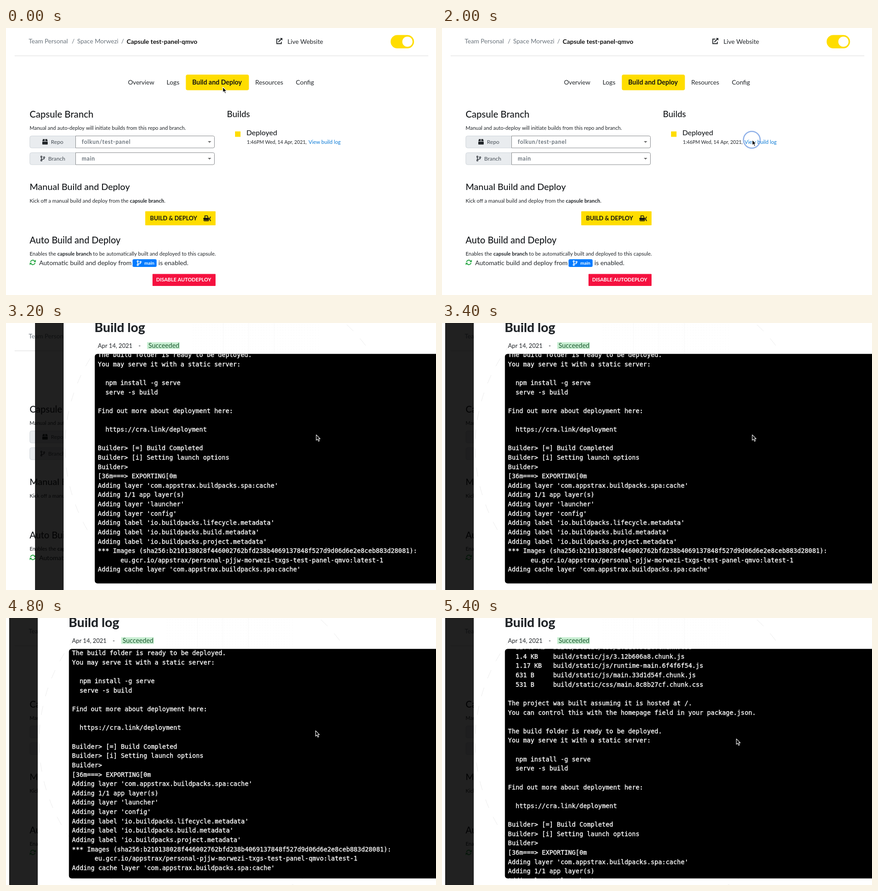
Recreate the animation shown at these times as an HTML page with a canvas. Size 948 by 590 pixels, loop 5600 ms.

```html
<!DOCTYPE html>
<html lang="en">
<head>
<meta charset="utf-8">
<title>Build and Deploy</title>
<style>
  html, body { margin: 0; width: 100%; height: 100%; overflow: hidden; background: #fff; }
  canvas { display: block; width: 948px; height: 590px; }
</style>
</head>
<body>
<canvas id="stage"></canvas>
<script>
const W = 948, H = 590, LOOP = 5600, STEP = 200;
const SANS = 'Lato, "Open Sans", sans-serif';
const MONO = '"DejaVu Sans Mono", "Liberation Mono", monospace';
const YELLOW = '#ffdd00', INK = '#212529', GREY = '#6c757d';

const canvas = document.getElementById('stage');
const ctx = canvas.getContext('2d');
const dpr = window.devicePixelRatio || 1;
canvas.width = W * dpr;
canvas.height = H * dpr;

const clamp = v => Math.min(1, Math.max(0, v));
const span = (t, a, b) => clamp((t - a) / (b - a));
const ease = p => p * p * (3 - 2 * p);

// y is the middle of the capitals; returns the x where the text ends
function text(str, x, y, size, color = INK, weight = 400, gap = 0) {
  ctx.font = `${weight} ${size}px ${SANS}`;
  ctx.letterSpacing = gap + 'px';
  ctx.fillStyle = color;
  ctx.fillText(str, x, y + size * 0.36);
  const end = x + ctx.measureText(str).width;
  ctx.letterSpacing = '0px';
  return end;
}

const heading = (str, x, y, size) => text(str, x, y, size, '#16191c', 500);

function box(x, y, w, h, r, fill, stroke) {
  ctx.beginPath();
  ctx.roundRect(x, y, w, h, r);
  if (fill) { ctx.fillStyle = fill; ctx.fill(); }
  if (stroke) { ctx.strokeStyle = stroke; ctx.lineWidth = 1; ctx.stroke(); }
}

function circle(x, y, r, fill) {
  ctx.beginPath();
  ctx.arc(x, y, r, 0, Math.PI * 2);
  ctx.fillStyle = fill;
  ctx.fill();
}

function line(color, width, ...pts) {
  ctx.beginPath();
  for (let i = 0; i < pts.length; i += 2) ctx.lineTo(pts[i], pts[i + 1]);
  ctx.strokeStyle = color;
  ctx.lineWidth = width;
  ctx.stroke();
}

function shape(fill, ...pts) {
  ctx.beginPath();
  for (let i = 0; i < pts.length; i += 2) ctx.lineTo(pts[i], pts[i + 1]);
  ctx.closePath();
  ctx.fillStyle = fill;
  ctx.fill();
}

function at(x, y, draw) {
  ctx.save();
  ctx.translate(x, y);
  draw();
  ctx.restore();
}

function linkIcon() {
  line(INK, 1.8, 0, -4.5, -5.5, -4.5, -5.5, 5.5, 4.5, 5.5, 4.5, 1.5);
  line(INK, 2, -2, 2, 4.5, -4.5);
  shape(INK, 1.3, -6.8, 6.8, -6.8, 6.8, -1.3);
}

function packageIcon() {
  shape(INK, -4.5, -6, -0.6, -6, -0.6, -1.5, -6, -1.5);
  shape(INK, 0.6, -6, 4.5, -6, 6, -1.5, 0.6, -1.5);
  box(-6, -0.5, 12, 6.5, 1, INK);
}

function branchIcon(color) {
  const ring = (x, y) => {
    ctx.beginPath();
    ctx.arc(x, y, 1.5, 0, Math.PI * 2);
    ctx.lineWidth = 1.4;
    ctx.stroke();
  };
  line(color, 1.5, -3, -2.5, -3, 2.5);
  line(color, 1.5, 3, -1, 3, 0.3, 2, 1.2, -3, 1.7);
  ring(-3, -4);
  ring(-3, 4);
  ring(3, -2.6);
}

function refreshIcon() {
  const color = '#28a745';
  ctx.strokeStyle = color;
  ctx.lineWidth = 2;
  for (let i = 0; i < 2; i++) {
    ctx.beginPath();
    ctx.arc(0, 0, 5, Math.PI * 1.05, Math.PI * 1.8);
    ctx.stroke();
    shape(color, 6.8, -6, 6.8, -0.8, 1.6, -0.8);
    ctx.rotate(Math.PI);
  }
}

function dozerIcon() {
  const c = '#111';
  line(c, 1.6, -4.5, 0, -4.5, -5.5, 1, -5.5, 3, 0);
  box(-8, -1, 12.5, 3.5, 1, c);
  box(-7.5, 2.2, 12, 4.3, 2.1, c);
  for (const x of [-4.7, -1.5, 1.7]) circle(x, 4.4, 0.9, YELLOW);
  line(c, 1.6, 8.2, -3.5, 6.4, -1, 6.4, 3, 8.4, 6);
  line(c, 1.3, 4, 1.5, 6.4, 1.5);
}

function field(y, label, labelX, value) {
  box(52.5, y, 101, 26.5, [4, 0, 0, 4], '#e9ecef', '#ced4da');
  box(153.5, y, 306, 26.5, [0, 3, 3, 0], '#fff', '#85888b');
  text(label, labelX, y + 13, 12.2, '#495057');
  text(value, 167, y + 13.2, 12.3, GREY, 700, 0.7);
  shape('#6a6a6a', 445, y + 11.5, 452.5, y + 11.5, 448.7, y + 15.3);
}

function page() {
  text('Team Personal', 50, 29.5, 13.7, GREY);
  text('/', 145, 29.5, 13.7, GREY);
  text('Space Morwezi', 157, 29.5, 13.6, GREY);
  text('/', 254, 29.5, 13.7, GREY);
  text('Capsule test-panel-qmvo', 266, 29.5, 14, '#111', 700);
  at(602.5, 29, linkIcon);
  text('Live Website', 620.5, 29.5, 13.9);
  box(848, 15.5, 51.5, 29.5, 14.75, YELLOW);
  circle(885, 30.2, 11.3, '#fff');
  line('#dcdcdc', 1, 19, 61.5, 931, 61.5);

  box(396.5, 103, 139, 34.5, 4, YELLOW);
  text('Overview', 269, 120, 13.6);
  text('Logs', 354, 120, 14.2);
  text('Build and Deploy', 410.5, 120, 14.4, '#111', 700);
  text('Resources', 549.5, 120, 13.8);
  text('Config', 639, 120, 14);

  heading('Capsule Branch', 52, 190.5, 20.6);
  text('Manual and auto-deploy will initiate builds from this repo and branch.', 52, 221, 11.35);
  field(238.5, 'Repo', 99, 'folkun/test-panel');
  at(86, 251.5, packageIcon);
  field(275.5, 'Branch', 93, 'main');
  at(81, 288.5, () => branchIcon('#343a40'));

  heading('Manual Build and Deploy', 52, 351, 20);
  let x = text('Kick off a manual build and deploy from the ', 52, 381.5, 11.45);
  x = text('capsule branch', x, 381.5, 11.4, INK, 700);
  text('.', x, 381.5, 11.45);
  box(307, 405, 155, 31, 1, YELLOW);
  text('BUILD & DEPLOY', 317.5, 420.5, 12.9, '#111', 700);
  at(443, 420.5, dozerIcon);

  heading('Auto Build and Deploy', 52, 468.5, 20.2);
  x = text('Enables the ', 52, 499, 11.5);
  x = text('capsule branch', x, 499, 11.4, INK, 700);
  text(' to be automatically built and deployed to this capsule.', x, 499, 11.5);
  at(59, 518, refreshIcon);
  text('Automatic build and deploy from', 73, 518.5, 14.2);
  box(279, 511, 53, 17, 3, '#007bff');
  at(293.5, 519.5, () => branchIcon('#fff'));
  text('main', 305, 519.7, 10.2, '#fff', 700);
  text('is enabled.', 336, 518.5, 14.3);
  box(323, 543.5, 139, 26.5, 1, '#f5113f');
  text('DISABLE AUTODEPLOY', 331, 556.5, 11.1, '#fff', 700);

  heading('Builds', 487, 190.5, 19);
  box(505, 228.5, 12, 12, 0, YELLOW);
  heading('Deployed', 530, 231, 16);
  text('1:46PM Wed, 14 Apr, 2021,', 531, 252, 10.7);
  text('View build log', 667, 252, 11.4, '#0a7ad6');
}

const log = `  22.48 KB  build/static/css/2.21d05e2c.chunk.css
  1.4 KB    build/static/js/3.12b606a8.chunk.js
  1.17 KB   build/static/js/runtime-main.6f4f6f54.js
  631 B     build/static/js/main.33d1d54f.chunk.js
  531 B     build/static/css/main.8c8b27cf.chunk.css

The project was built assuming it is hosted at /.
You can control this with the homepage field in your package.json.

The build folder is ready to be deployed.
You may serve it with a static server:

  npm install -g serve
  serve -s build

Find out more about deployment here:

  https://cra.link/deployment

Builder> [=] Build Completed
Builder> [i] Setting launch options
Builder>
[36m===> EXPORTING[0m
Adding layer 'com.appstrax.buildpacks.spa:cache'
Adding 1/1 app layer(s)
Adding layer 'launcher'
Adding layer 'config'
Adding label 'io.buildpacks.lifecycle.metadata'
Adding label 'io.buildpacks.build.metadata'
Adding label 'io.buildpacks.project.metadata'
*** Images (sha256:b210138028f446002762bfd238b4069137848f527d9d06d6e2e8ceb883d28081):
      eu.gcr.io/appstrax/personal-pjjw-morwezi-txgs-test-panel-qmvo:latest-1
Adding cache layer 'com.appstrax.buildpacks.spa:cache'`.split('\n');
const ROW = 20.63, FIRST = 70.6 - 9 * ROW;

function backdrop() {
  ctx.setLineDash([20, 22]);
  ctx.beginPath();
  ctx.arc(372, 273, 369, 0, Math.PI * 2);
  ctx.strokeStyle = '#ececec';
  ctx.lineWidth = 1;
  ctx.stroke();
  ctx.setLineDash([1, 5]);
  for (let y = 4; y < 68; y += 6) line('#f5f5f5', 1, 285, y, 565, y);
  ctx.setLineDash([]);
  for (const x of [352, 408, 464]) line('#f8f8f8', 1, x, 0, x, 68);
}

// x is the left edge of the white panel
function drawer(x, scroll) {
  ctx.fillStyle = 'rgba(0,0,0,.87)';
  ctx.fillRect(x - 63, 0, 63, H);
  at(x, 0, () => {
    ctx.fillStyle = '#fff';
    ctx.fillRect(0, 0, W, H);
    backdrop();
    text('Build log', 68, 9.5, 28.6, INK, 800);
    text('Apr 14, 2021', 75.5, 50, 13.1);
    text('-', 165, 50, 13.5);
    box(184, 42.5, 72, 15, 0, '#c9efd3');
    text('Succeeded', 187, 50, 14.4, '#1d5a30');
    box(68.7, 68.2, W, 507.4, 6, '#000');
    ctx.beginPath();
    ctx.rect(69, 68.5, W, 507);
    ctx.clip();
    ctx.font = `13.75px ${MONO}`;
    ctx.fillStyle = ctx.strokeStyle = '#fff';
    ctx.lineWidth = 0.35;
    log.forEach((row, i) => {
      const y = FIRST + i * ROW + scroll + 4.4;
      ctx.fillText(row, 75.6, y);
      ctx.strokeText(row, 75.6, y);
    });
  });
}

function pointer(x, y) {
  at(x, y, () => {
    ctx.lineJoin = 'round';
    shape('#000', 0, 0, 0, 12, 2.8, 9.4, 4.9, 14.2, 6.9, 13.3, 4.9, 8.7, 8.6, 8.7);
    ctx.strokeStyle = '#fff';
    ctx.lineWidth = 1.1;
    ctx.stroke();
  });
}

function ripple(t) {
  const p = span(t, 2000, 2200);
  ctx.beginPath();
  ctx.arc(683, 247 + p, 18.4 + 2.4 * p, 0, Math.PI * 2);
  ctx.strokeStyle = 'rgba(105,150,225,.75)';
  ctx.lineWidth = 2.5;
  ctx.stroke();
}

function draw(t) {
  ctx.setTransform(dpr, 0, 0, dpr, 0, 0);
  ctx.fillStyle = '#fff';
  ctx.fillRect(0, 0, W, H);
  page();

  const go = ease(span(t, 200, 1800));
  const pull = span(t, 4600, 5400);
  if (t >= 3200) drawer(70 + 57 * (1 - span(t, 3200, 3400)), 179.8 * pull ** 2.3);
  if (t >= 2000 && t < 3200) ripple(t);
  pointer(478 + 206 * go - 35 * pull ** 2.3, 130.5 + 116.7 * go + 20 * pull ** 1.7);
}

let last = -1;
const start = performance.now();
function tick(now) {
  const t = Math.floor((Math.max(0, now - start) % LOOP) / STEP) * STEP;
  if (t !== last) draw(last = t);
  requestAnimationFrame(tick);
}
draw(0);
requestAnimationFrame(tick);
</script>
</body>
</html>
```
